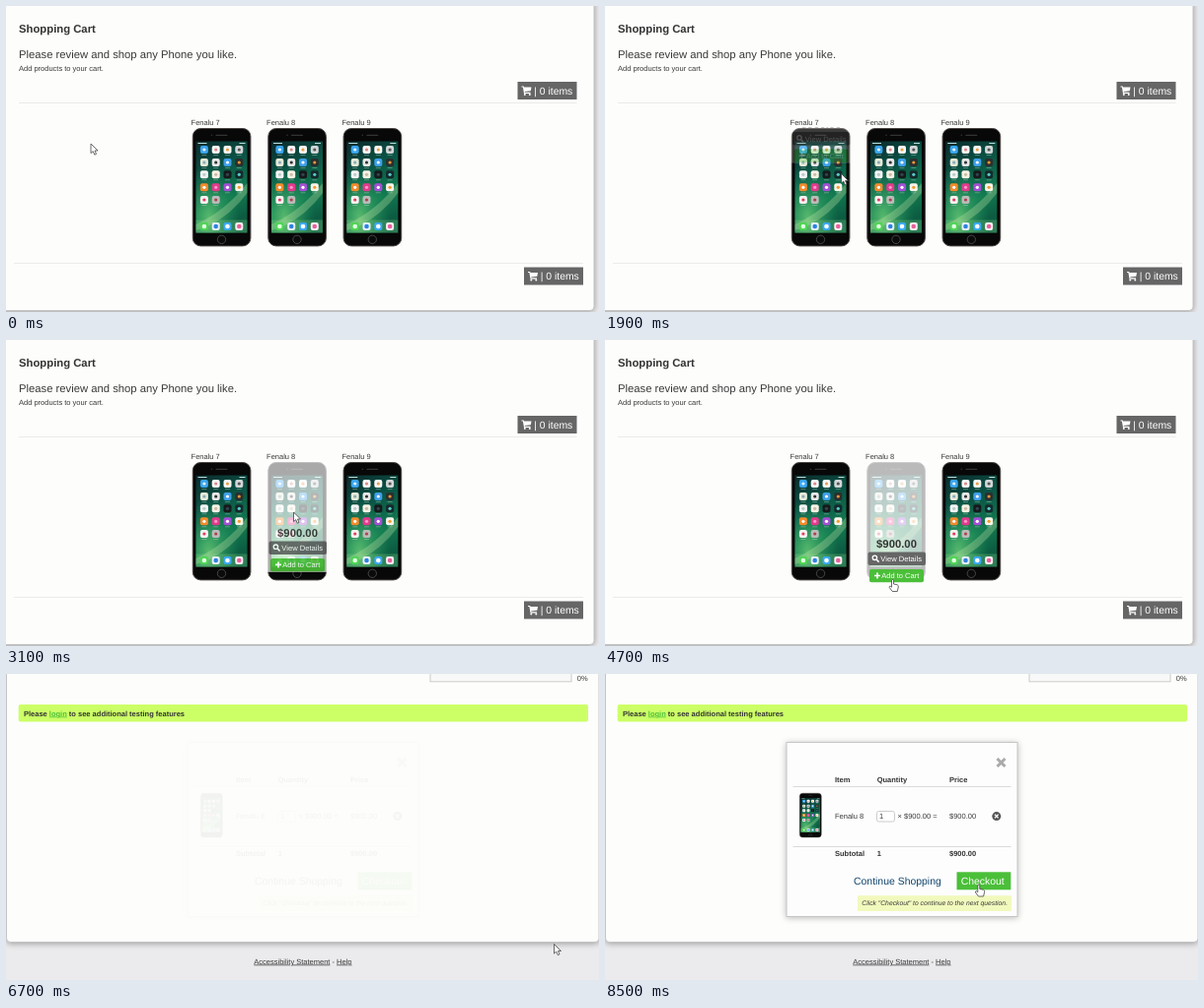
Write an HTML page that moves like this. It is 601 px wide and 311 px high and loops after 8.6 s.

```html
<!DOCTYPE html>
<html lang="en">
<head>
<meta charset="utf-8">
<title>Shopping Cart</title>
<style>
  html, body { margin: 0; width: 100%; height: 100%; overflow: hidden; background: #ebebed; }
  svg { display: block; font-family: "Liberation Sans", Arial, sans-serif; }
  text { white-space: pre; text-rendering: geometricPrecision; }
  .sheet { fill: #fdfdfb; stroke: #c4c4c6; filter: drop-shadow(0 1px 3px #999); }
  .box { fill: #fdfdfd; stroke: #c6c6c6; filter: drop-shadow(0 1px 3px #bbb); }
</style>
</head>
<body>
<svg id="stage" width="601" height="311" viewBox="0 0 601 311"></svg>
<script>
const LOOP = 8600, STEP = 100, SCROLL = 6700, ADDED = 4800;
const GREEN = '#4bbf39', GREY = '#666', INK = '#3a3a3a';
const BOLD = 'font-weight="bold"', PRODUCT = 'Fenalu';
const phoneX = [188.5, 265, 341.3];

const text = (x, y, str, size = 7.5, fill = INK, extra = '') =>
  `<text x="${x}" y="${y}" font-size="${size}" fill="${fill}" ${extra}>${str}</text>`;
const rect = (x, y, w, h, fill, r = 0, extra = '') =>
  `<rect x="${x}" y="${y}" width="${w}" height="${h}" rx="${r}" fill="${fill}" ${extra}/>`;
const circle = (x, y, r, fill, extra = '') =>
  `<circle cx="${x}" cy="${y}" r="${r}" fill="${fill}" ${extra}/>`;
const stroke = (d, color, width = 1) =>
  `<path d="${d}" fill="none" stroke="${color}" stroke-width="${width}"/>`;
const group = (id, body, extra = '') => `<g id="${id}" ${extra}>${body}</g>`;

function phone() {
  // each app tile: background and mark
  const rows = [
    '#3aa5f0 #e8f4ff, #f8f8f8 #d88, #f8f8f8 #e8a04a, #d3d6d8 #555',
    '#e6ead8 #8ab, #e8e8e8 #333, #3f9fe8 #fff, #2a2f30 #e8963a',
    '#f4f4f4 #bcc, #f6f2e4 #cba, #151a1a #345, #16292b #5cc',
    '#f48a2c #fff, #e23a8c #f9c, #a44fd6 #fff, #f8f4ea #f29a2e',
    '#f6f2f2 #e0405a, #b9bcbc #a44',
    '#4fd455 #e0ffe0, #e4f0fa #3080e0, #3aa8f4 #fff, #f8f0f4 #e8609a',
  ];
  const rowY = [22, 35, 47.3, 60.3, 73, 100];
  const icons = rows.map((row, r) => row.split(', ').map((pair, c) => {
    const [color, mark] = pair.split(' ');
    const x = 12.4 + c * 11.8, y = rowY[r];
    return rect(x - 4, y - 4, 8, 8, color, 2) + circle(x, y, r === 5 ? 2.3 : 1.6, mark) +
      (r < 5 ? rect(x - 2.5, y + 5.2, 5, .7, '#b9d3c8', 0, 'opacity=".6"') : '');
  }).join('')).join('');
  return rect(.8, .5, 58.6, 119.4, '#080808', 8, 'stroke="#4b4443"') +
    rect(24, 6.7, 12, 1.3, '#333', .6) + circle(20, 7.3, .8, '#333') +
    rect(4, 13.5, 52, 93, 'url(#wall)') + rect(4, 13.5, 52, 93, 'url(#glow)') +
    '<path d="M4 98Q34 84 56 56V66Q40 88 16 100L4 104Z" fill="#c9e8a8" opacity=".3"/>' +
    rect(4, 93.5, 52, 13, '#8fe08a', 0, 'opacity=".25"') +
    rect(6, 15, 9, 1, '#bdd') + rect(48, 15, 6, 1, '#bdd') + icons +
    circle(30, 113.3, 4.2, '#0b0b0b', 'stroke="#555" stroke-width=".8"');
}

const usePhone = (x, y, scale = 1) =>
  `<use href="#phone" transform="translate(${x} ${y}) scale(${scale})"/>`;

const cartIcon = (x, y) => `<g transform="translate(${x} ${y})" fill="#fff">
  <path d="M0 .4H2.2L2.5 1.6H10L9.3 5.3 3.2 6 3.4 6.8H9V7.9H2.5L1.4 1.5H0Z"/>
  ${circle(3.3, 9.1, 1, '#fff')}${circle(8.3, 9.1, 1, '#fff')}</g>`;

function cartButton(right, y, label, color, width) {
  const x = right - width;
  return rect(x, y, width, 18, color) + cartIcon(x + 4, y + 4) +
    text(right - 4.2, y + 12.6, label, 10.4, '#fff', 'text-anchor="end"');
}
const cartButtons = (...style) => cartButton(578.5, 77, ...style) + cartButton(585, 265.5, ...style);

const overlay = i => `<g transform="translate(${phoneX[i]} 0)" clip-path="url(#frame)">` +
  group('overlay' + i,
    rect(-.5, 123, 61.5, 124, '#fff', 0, 'opacity=".72"') +
    text(30.5, 211, '$900.00', 11.3, '#333', BOLD + ' text-anchor="middle"') +
    rect(1.5, 215.5, 58.5, 13.5, GREY, 2) +
    circle(8.4, 221.3, 2.2, 'none', 'stroke="#fff" stroke-width="1.3"') +
    stroke('M10 223l2.6 2.6', '#fff', 1.5) + text(14.3, 225, 'View Details', 7.6, '#fff') +
    rect(3, 233, 55, 13.3, GREEN, 2) + stroke('M8 239.5h6m-3-3v6', '#fff', 1.7) +
    text(15.3, 242.3, 'Add to Cart', 7.5, '#fff')) + '</g>';

const shop = '<rect class="sheet" x="-9" y="-9" width="605" height="318.5" rx="4"/>' +
  text(13, 27, 'Shopping Cart', 11.3, '#333', BOLD) +
  text(13, 53, 'Please review and shop any Phone you like.', 11.27) +
  text(13, 66, 'Add products to your cart.') +
  stroke('M13 98.5H578.5M8 261.5H585', '#ebebe9') +
  group('empty', cartButtons('| 0 items', GREY, 60)) +
  group('filled', cartButtons('| 1 item', GREEN, 54.7) + text(320.3, 121.5, '1', 11.3, GREEN)) +
  phoneX.map((x, i) => text(x - .9, 121.2, `${PRODUCT} ${i + 7}`) + usePhone(x, 124)).join('') +
  overlay(0) + overlay(1);

const boldRow = (y, ...labels) =>
  labels.map((label, i) => text([233, 275.7, 349][i], y, label, 7.5, '#333', BOLD)).join('');

const modal = '<rect class="box" x="184" y="69.5" width="234" height="177"/>' +
  stroke('M397.5 86l8 8m0-8l-8 8', '#aaa', 3) +
  boldRow(110, 'Item', 'Quantity', 'Price') + boldRow(185, 'Subtotal', '1', '$900.00') +
  stroke('M190.5 114.5H411.5M190.5 175.5H411.5', '#dadada') +
  usePhone(197, 121, .375) + text(233, 147, PRODUCT + ' 8') +
  rect(275.5, 139.5, 18, 10.5, '#fff', 2, 'stroke="#ccc"') + text(278, 147.2, '1') +
  text(296.5, 147, '× $900.00 =') + text(349, 147, '$900.00') +
  circle(396.8, 144.6, 4.5, '#555') + stroke('M395 142.8l3.6 3.6m0-3.6l-3.6 3.6', '#fff', 1.3) +
  text(252, 214, 'Continue Shopping', 10.45, '#11466f') +
  rect(356.5, 201.3, 54.8, 18, GREEN) + text(360.8, 214, 'Checkout', 10.4, '#fff') +
  rect(256, 225.2, 156, 15.8, '#f2f9bd') +
  text(260.3, 235.2, 'Click "Checkout" to continue to the next question.', 6.78, INK, 'font-style="italic"');

const underline = 'text-decoration="underline"';
const cart = '<rect class="sheet" x=".5" y="-9" width="600.5" height="281.5" rx="4"/>' +
  rect(430, -4, 143, 11.8, '#f8f8f8', 0, 'stroke="#ccc"') + text(578.8, 7, '0%') +
  rect(12.7, 31, 577.3, 17.6, '#cf6', 2) +
  text(18, 42.5, `Please <tspan fill="${GREEN}" ${underline}>login</tspan> to see additional testing features`, 7.5, '#333', BOLD) +
  text(251.3, 294.5, `<tspan ${underline}>Accessibility Statement</tspan> - <tspan ${underline}>Help</tspan>`) +
  group('modal', modal);

const outline = 'fill="#fff" stroke="#444" stroke-width=".8" stroke-linejoin="round"';
const cursor = group('arrow', `<path d="M0 0V9.6L2.2 7.6 3.8 11.2 5.5 10.4 4 7H7Z" ${outline}/>`) +
  group('hand', `<path d="M-1 .8Q0-.7 1 .8V4.5L4.8 5.3Q6 5.7 5.8 7.5L4.8 12H-.3L-3.3 8Q-3.5 6.5-2.3 6.7L-1 7.7Z" ${outline}/>`);

const stage = document.getElementById('stage');
stage.innerHTML = `<defs>
  <linearGradient id="wall" x2=".3" y2="1">
    <stop offset="0" stop-color="#0a2a2c"/><stop offset=".4" stop-color="#0b5546"/>
    <stop offset=".75" stop-color="#127a50"/><stop offset="1" stop-color="#0c5c42"/>
  </linearGradient>
  <radialGradient id="glow" cx=".25" cy=".85" r=".6">
    <stop offset="0" stop-color="#6fcf78" stop-opacity=".8"/><stop offset="1" stop-color="#1f9a60" stop-opacity="0"/>
  </radialGradient>
  <clipPath id="frame">${rect(-.5, 123, 61.5, 124, '#000')}</clipPath>
  ${group('phone', phone())}</defs>` +
  group('shop', shop) + group('cart', cart) + group('cursor', cursor);

const $ = id => document.getElementById(id);
const show = (id, on) => $(id).setAttribute('display', on ? 'inline' : 'none');
const clamp = v => Math.min(1, Math.max(0, v));

// cubic-bezier(.25, .1, .25, 1)
function ease(x) {
  let lo = 0, hi = 1, u;
  for (let i = 0; i < 20; i++) {
    u = (lo + hi) / 2;
    if (.75 * u * (1 - u) + u ** 3 < x) lo = u; else hi = u;
  }
  return x <= 0 ? 0 : x >= 1 ? 1 : .3 * u * (1 - u) ** 2 + 3 * u * u * (1 - u) + u ** 3;
}

// time, x, y, hand
const path = [
  [0, 86, 140, 0], [400, 171, 152, 0], [1600, 171, 152, 0], [1900, 239.5, 170.5, 0],
  [2300, 242, 174, 0], [2500, 242, 174, 0], [2900, 288, 176, 0], [3100, 291.5, 175, 0],
  [3700, 291.5, 175, 0], [3900, 291, 229, 0], [4300, 291, 232, 0], [4400, 291.5, 243.5, 1],
  [4700, 291.5, 243.5, 1], [4800, 300, 253, 0], [5400, 578, 298, 0], [5800, 578, 298, 0],
  [6000, 564.5, 267, 1], [6400, 564.5, 267, 1], [6500, 559, 275, 1], [6600, 559, 275, 1],
  [6700, 555.5, 274.5, 0], [7000, 555.5, 274.5, 0], [7500, 378.8, 214, 1], [LOOP, 378.8, 214, 1],
];

function setOverlay(id, t, enter, leave) {
  const p = ease(clamp((t - enter) / 500)) - ease(clamp((t - leave) / 500));
  $(id).setAttribute('transform', `translate(0 ${-124 * (1 - p)})`);
  $(id).setAttribute('opacity', p);
}

function render(now) {
  const t = Math.floor(now % LOOP / STEP) * STEP;
  show('shop', t < SCROLL);
  show('cart', t >= SCROLL);
  show('empty', t < ADDED);
  show('filled', t >= ADDED);
  setOverlay('overlay0', t, 1800, 2600);
  setOverlay('overlay1', t, 2780, 4750);
  $('modal').setAttribute('opacity', .5 - Math.cos(Math.PI * clamp((t - 6650) / 400)) / 2);

  const i = path.findIndex(k => k[0] > t);
  const [t0, x0, y0, hand] = path[i - 1], [t1, x1, y1] = path[i];
  const p = (t - t0) / (t1 - t0);
  $('cursor').setAttribute('transform', `translate(${x0 + (x1 - x0) * p} ${y0 + (y1 - y0) * p})`);
  show('arrow', !hand);
  show('hand', hand);
}

const start = performance.now();
function tick() {
  render(performance.now() - start);
  requestAnimationFrame(tick);
}
tick();
</script>
</body>
</html>
```
